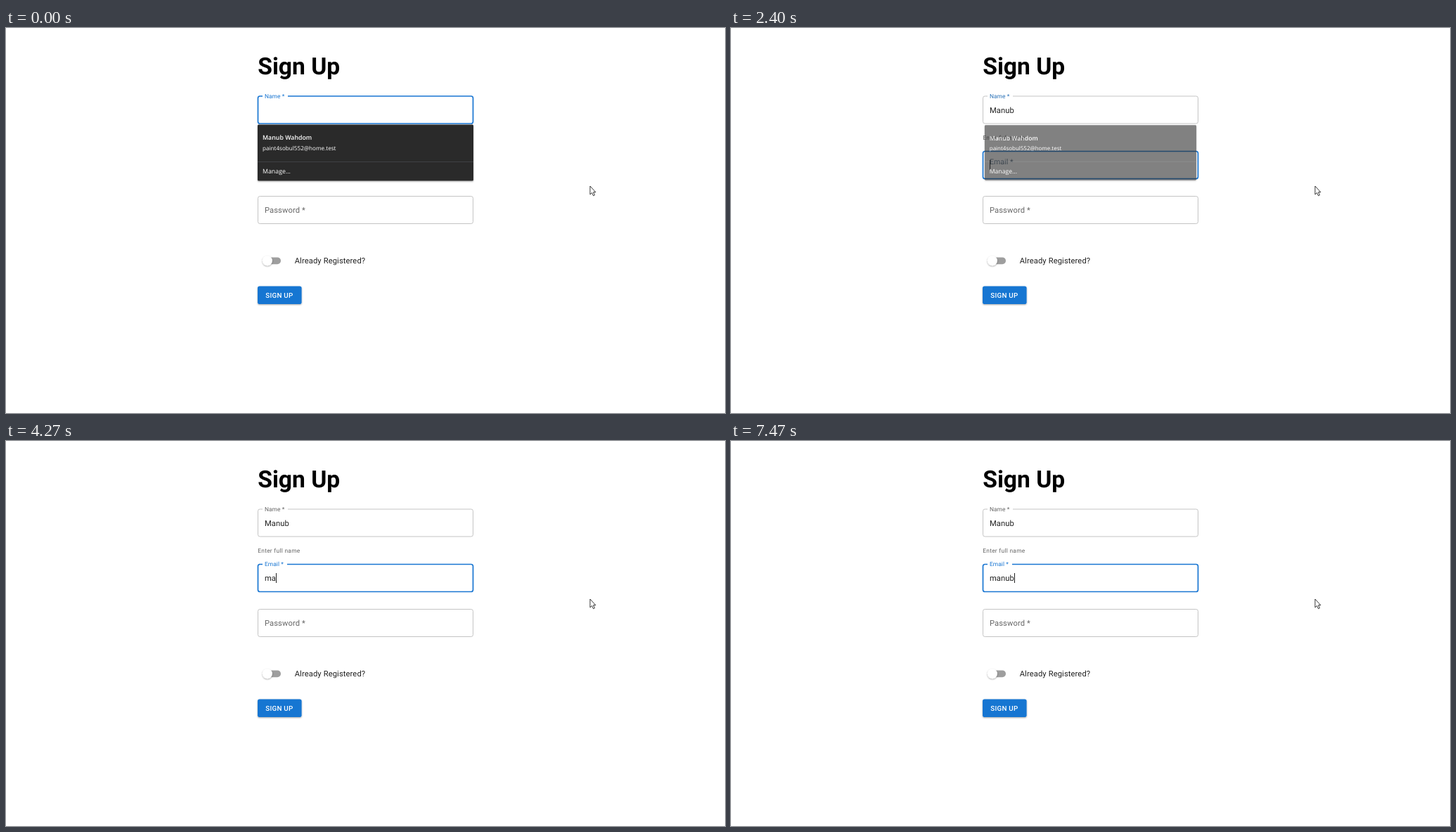
Write an HTML page that moves like this. It is 1023 by 548 pixels and loops after 8 s.

```html
<!DOCTYPE html>
<html lang="en">
<head>
<meta charset="utf-8">
<title>Sign Up</title>
<style>
  html, body { margin: 0; width: 100%; height: 100%; overflow: hidden; background: #fff; }
  svg { display: block; width: 1023px; height: 548px; }
  text { font-family: Roboto, sans-serif; text-rendering: geometricPrecision; white-space: pre; }
  .body { font-size: 11.2px; letter-spacing: .00938em; fill: #212121; }
  .muted { fill: #666; }
  .small { font-size: 8.4px; }
  .helper { letter-spacing: .0333em; }
  .box { fill: none; stroke: #c4c4c4; stroke-width: 1; }
  .box.focus { stroke: #1976d2; stroke-width: 1.7; }
  #popup { transform-origin: 511.5px 177.5px; }
  #popup text { font-family: "Open Sans", "Noto Sans", sans-serif; fill: #fff; }
</style>
</head>
<body>
<svg viewBox="0 0 1023 548">
  <defs>
    <filter id="soft" x="-20%" y="-20%" width="140%" height="160%">
      <feDropShadow dx="0" dy="1" stdDeviation="1" flood-opacity=".35"/>
    </filter>
  </defs>

  <text x="358.3" y="66" font-size="33.6" font-weight="700">Sign Up</text>

  <rect id="nameBox" class="box" x="358.5" y="97" width="306" height="39" rx="2.8"/>
  <rect x="365" y="94" width="36" height="5" fill="#fff"/>
  <text id="nameLabel" class="body small" x="367.9" y="99.5">Name *</text>
  <text id="nameText" class="body" x="367.9" y="121"></text>
  <text class="body muted small helper" x="358.2" y="159">Enter full name</text>

  <rect id="emailBox" class="box" x="358.5" y="175.5" width="306" height="39" rx="2.8"/>
  <rect id="emailGap" x="365" y="173" width="35" height="5" fill="#fff"/>
  <text id="emailLabel" class="body" x="367.9">Email *</text>
  <text id="emailText" class="body" x="367.9" y="199"></text>

  <rect class="box" x="358.5" y="239.5" width="306" height="39" rx="2.8"/>
  <text class="body muted" x="367.9" y="263">Password *</text>

  <rect x="367.2" y="326.4" width="23.8" height="9.8" rx="4.9" fill="#9e9e9e"/>
  <circle cx="371.9" cy="331.3" r="7" fill="#fff" filter="url(#soft)"/>
  <text class="body" x="410.7" y="335">Already Registered?</text>

  <rect x="358" y="367.5" width="62.6" height="25.5" rx="2.8" fill="#1976d2" filter="url(#soft)"/>
  <text x="369.2" y="383.5" font-size="9.8" font-weight="500" letter-spacing=".28" fill="#fff">SIGN UP</text>

  <rect id="caret" width="1" height="14" fill="#212121"/>

  <g id="popup">
    <rect x="358" y="137.5" width="307" height="80" rx="1.5" fill="#292a2c" filter="url(#soft)"/>
    <path d="M358 190.5H665" stroke="#3f4144"/>
    <text x="365" y="159.2" font-size="8.8" font-weight="600">Manub Wahdom</text>
    <text x="365" y="174" font-size="8.15">paint4sobul552@home.test</text>
    <text x="365" y="207.2" font-size="8.8">Manage...</text>
  </g>

  <path d="M831 225V237L833.7 234.5L835.6 238.7L837.6 237.8L835.7 233.7H839Z" fill="#fff" stroke="#222" stroke-width=".9"/>
</svg>
<script>
const $ = id => document.getElementById(id);
const LOOP = 8000, LEFT = 367.9;
const GRAY = [102, 102, 102], BLUE = [25, 118, 210];

// [time, text, caret shown]
const nameKeys = [
  [0, '', 0], [400, '', 1], [870, 'M', 1], [1070, 'Ma', 1],
  [1200, 'Man', 1], [1330, 'Manu', 1], [1870, 'Manub', 1]
];
const emailKeys = [
  [0, '', 1], [2930, '', 0], [3470, '', 1], [4000, '', 0], [4070, 'm', 1],
  [4270, 'ma', 1], [4600, 'man', 1], [4930, 'mano', 1], [5470, 'mano', 0],
  [5530, 'manob', 1], [6070, 'manob', 0], [6270, 'mano', 1], [6400, 'manob', 1],
  [6930, 'mano', 0], [7070, 'man', 1], [7130, 'manu', 1], [7470, 'manub', 1]
];
// [time, popup opacity, popup scale, label float]
const blurSteps = [
  [0, 1, 1, 0], [2330, .95, .998, 0], [2400, .59, .981, .24],
  [2470, .08, .965, .86], [2530, 0, .96, .98], [2600, 0, .96, 1]
];

const stepAt = (list, t) => list.findLast(s => s[0] <= t);
const mix = (a, b, p) => a + (b - a) * p;
const blend = (a, b, p) => `rgb(${a.map((v, i) => Math.round(mix(v, b[i], p)))})`;

function setText(el, value) {
  if (el.textContent !== value) el.textContent = value;
}

function render(t) {
  const onEmail = t >= 2400;
  const [, nameValue, nameCaret] = stepAt(nameKeys, t);
  const [, emailValue, emailCaret] = stepAt(emailKeys, t);
  const [, opacity, scale, p] = stepAt(blurSteps, t);

  setText($('nameText'), nameValue);
  setText($('emailText'), emailValue);
  $('nameBox').classList.toggle('focus', !onEmail);
  $('emailBox').classList.toggle('focus', onEmail);
  $('emailGap').style.opacity = t >= 2470 ? 1 : 0;

  $('nameLabel').style.fill = blend(BLUE, GRAY, p);
  const label = $('emailLabel');
  label.style.fill = blend(GRAY, BLUE, p);
  label.style.fontSize = mix(11.2, 8.4, p) + 'px';
  label.setAttribute('y', mix(199, 178, p));

  $('popup').style.opacity = opacity;
  $('popup').style.transform = `scale(${scale})`;

  const field = onEmail ? $('emailText') : $('nameText');
  const width = field.textContent ? field.getComputedTextLength() : 0;
  const caret = $('caret');
  caret.setAttribute('x', Math.round(LEFT + width));
  caret.setAttribute('y', onEmail ? 188 : 110);
  caret.style.opacity = (onEmail ? emailCaret : nameCaret) ? 1 : 0;
}

const start = performance.now();
function tick() {
  render((performance.now() - start) % LOOP);
  requestAnimationFrame(tick);
}
tick();
</script>
</body>
</html>
```
